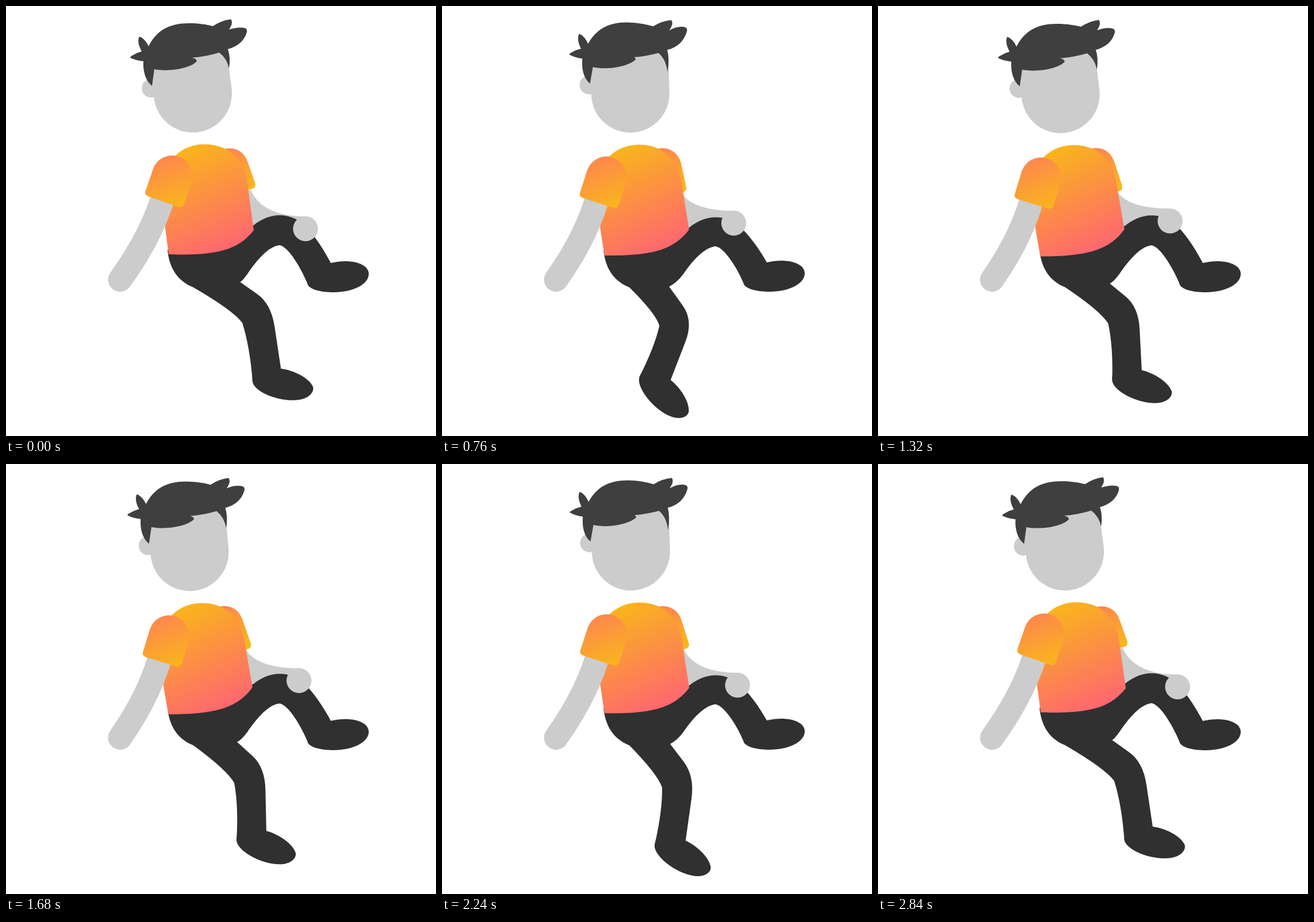
An HTML page with a canvas for the animation above (2880 ms loop, 748 by 748 pixels).

```html
<!DOCTYPE html>
<html lang="en">
<head>
<meta charset="utf-8">
<title>Seated figure</title>
<style>
  html, body { margin: 0; width: 100%; height: 100%; overflow: hidden; background: #fff; }
  canvas { display: block; width: 100%; height: 100%; }
</style>
</head>
<body>
<canvas width="748" height="748"></canvas>
<script>
const ctx = document.querySelector('canvas').getContext('2d');
const LOOP = 2880, STEP = 40;
const SKIN = '#ccc', HAIR = '#3f3f3f', PANTS = '#303030';
const YELLOW = '#f9b61a', ORANGE = '#fe8650', PINK = '#ff5f79';

// The front leg swings through four poses, a quarter of the loop apart
const LEG_POSES = [
  { knee: [411, 551], heel: [429, 654] },
  { knee: [378, 556], heel: [343, 645] },
  { knee: [402, 552], heel: [412, 652] },
  { knee: [382, 563], heel: [368, 663] }
];

const mix = (a, b, u) => a.map((v, i) => v + (b[i] - v) * u);
const polar = ([x, y], r, angle) => [x + r * Math.cos(angle), y + r * Math.sin(angle)];
const ease = u => (1 - Math.cos(Math.PI * u)) / 2;

function legPose(turn) {
  const beat = Math.floor(turn * 4), u = ease(turn * 4 - beat);
  const from = LEG_POSES[beat], to = LEG_POSES[(beat + 1) % 4];
  return { knee: mix(from.knee, to.knee, u), heel: mix(from.heel, to.heel, u) };
}

function shape(path, fill) {
  ctx.fillStyle = fill;
  ctx.fill(new Path2D(path));
}

function disc([x, y], r, fill) {
  ctx.fillStyle = fill;
  ctx.beginPath();
  ctx.arc(x, y, r, 0, 7);
  ctx.fill();
}

function gradient(x1, y1, x2, y2, from, to) {
  const g = ctx.createLinearGradient(x1, y1, x2, y2);
  g.addColorStop(0, from);
  g.addColorStop(1, to);
  return g;
}

function group(paint) {
  ctx.save();
  paint();
  ctx.restore();
}

function pivot(x, y, angle) {
  ctx.translate(x, y);
  ctx.rotate(angle);
  ctx.translate(-x, -y);
}

function drawFarArm([hx, hy], reach, nod, lean) {
  const kx = 430 + 4.5 * reach - 2.5 * nod, ky = 315 - 2 * reach + 3 * nod;
  shape(`M${kx - 9},${ky + 6} Q${kx + 11},${hy - 22} ${hx},${hy - 21.5}
    L${hx},${hy} L430,400 L400,330Z`, SKIN);
  const x = 388 - 9.5 * lean, y = 247.5 - lean / 2;
  shape(`M${x - 30},290 L${x - 20},255 Q${x - 10},${y} ${x},${y}
    C${x + 18},${y} ${x + 29},259 ${x + 33},273
    L${kx - 1},${ky - 6} Q${kx + 2},${ky + 3} ${kx - 7},${ky + 5} L${kx - 30},${ky + 12}Z`,
    gradient(x, 250, x + 32, 318, ORANGE, YELLOW));
}

function drawLegs({ knee, heel }, nod) {
  const hip = [326, 489.5];
  const tilt = Math.atan2(knee[0] - heel[0], heel[1] - knee[1]);
  const ankle = polar(heel, 54.5, tilt - .27);
  const kneeCap = polar(knee, 60, .8 * tilt - .44);
  const swing = 411 - knee[0];
  const crotch = [407 - .36 * swing, 480 + .25 * swing];

  const [tx, ty] = mix(hip, knee, .75);
  const thigh = polar([tx, ty], 8, Math.atan2(knee[1] - hip[1], knee[0] - hip[0]) - Math.PI / 2);
  const [sx, sy] = mix(knee, heel, .4);

  shape(`M281,425 C285,462 303,480 ${hip} Q${thigh} ${knee} Q${sx + 6},${sy} ${heel}
    L${ankle} L${mix(kneeCap, ankle, .35)} Q${kneeCap} ${mix(crotch, kneeCap, .55)} L${crotch}
    Q410,480 420,466 L440,400 L300,400Z`, PANTS);

  group(() => {
    ctx.translate(...heel);
    ctx.rotate(tilt);
    shape(`M1,-9 L0,0 C0,18 42,44.5 76,44.5 C92,44.5 103,36 102,26
      C98,10 74,-8 52.5,-14.5 L40,-25Z`, PANTS);
  });

  const top = 364 + 3.5 * nod, under = 416 + 2 * nod, drop = -nod;
  shape(`M400,480 L420,466 C436,443 456,${under + 2} 476,${under}
    C492,${under + 3} 514,${458 + drop} 524,${482 + drop}
    C526,${494 + drop} 550,${498 + drop} 570,${498 + drop}
    C604,${498 + drop} 631,${484 + drop} 631,${466 + drop}
    C631,${448 + drop} 600,${439 + drop} 565,${447 + drop}
    C551,421 535,${top + 32} 518,${top + 16} C506,${top + 6} 492,${top} 476,${top}
    C458,${top} 442,${top + 8} 430,${top + 18} L380,400Z`, PANTS);
}

function drawTorso(lean) {
  const sway = () => pivot(385, 455, -.036 * lean);
  group(() => {
    sway();
    shape(`M283,432 L276,380 L270,320 C272,270 305,240.5 345,240.5 C392,240.5 415,272 420,310
      L431,390 C405,423 370,435 283,432Z`, gradient(312, 245, 396, 440, YELLOW, PINK));
  });

  ctx.strokeStyle = SKIN;
  ctx.lineWidth = 42;
  ctx.lineCap = 'round';
  ctx.stroke(new Path2D(`M${278 - 6 * lean},${315 + 3 * lean}
    Q${258 - 3 * lean},${394 + lean} 198.5,476`));

  group(() => {
    sway();
    shape('M256,283 A35,35 0 0 1 322,307 L310,343 Q307,352 299,349 L247,331 Q240,328 243,321Z',
      gradient(268, 262, 298, 352, ORANGE, YELLOW));
  });
}

function drawHead(nod, lean) {
  group(() => {
    ctx.translate(-8.3 * lean, 1.2 * lean);
    disc([252.5 + 7.7 * nod, 143 - 6.5 * nod], 16.3, SKIN);
    group(() => {
      ctx.translate(325 + 7.2 * nod, 152 - .4 * nod);
      ctx.rotate(-.13 + .1 * nod);
      shape('M-68,0 V-50 Q-66,-75 -40,-75 H40 Q66,-75 68,-50 V0 A68,68 0 0 1 -68,0Z', SKIN);
    });
    pivot(375, 335, .04 * nod);
    const up = 4 * nod, tip = 96 - 2.5 * nod, notch = 323 + 6 * nod, side = 109 + 5 * nod;
    shape(`M254,139 C243,130 238,115 239,96 Q226,95 216,90 Q216,88 220,86 Q228,81 236,79
      Q227,62 232,53 Q242,57 248,70 C262,42 285,30 318,30 C335,30 348,32 360,35
      Q375,25 391,23 Q396,29 388,41 Q403,${36 - up} 414,${38 - up} Q420,${39 - up} 419,${45 - up}
      C415,${60 - up / 2} 404,70 386,75 Q391,90 388,${side} Q385,92 371,81 Q348,88 ${notch},90
      Q331,91 332,${tip} C322,${tip + 12} 285,115 258,110Z`, HAIR);
  });
}

function draw(now) {
  const turn = Math.floor(now / STEP) * STEP % LOOP / LOOP;
  const angle = 2 * Math.PI * turn;
  const lean = ease(2 * turn);
  const nod = Math.abs(Math.sin(angle)) ** 1.7;
  const reach = Math.cos(angle + Math.PI / 8);
  const hand = [515 + 6.5 * reach - 4.5 * nod, 381 + 7 * reach];

  ctx.fillStyle = '#fff';
  ctx.fillRect(0, 0, 748, 748);
  drawFarArm(hand, reach, nod, lean);
  drawLegs(legPose(turn), nod);
  drawTorso(lean);
  disc(hand, 21.7, SKIN);
  drawHead(nod, lean);
}

let start;
function tick(now) {
  start ??= now;
  draw(now - start);
  requestAnimationFrame(tick);
}
draw(0);
requestAnimationFrame(tick);
</script>
</body>
</html>
```
